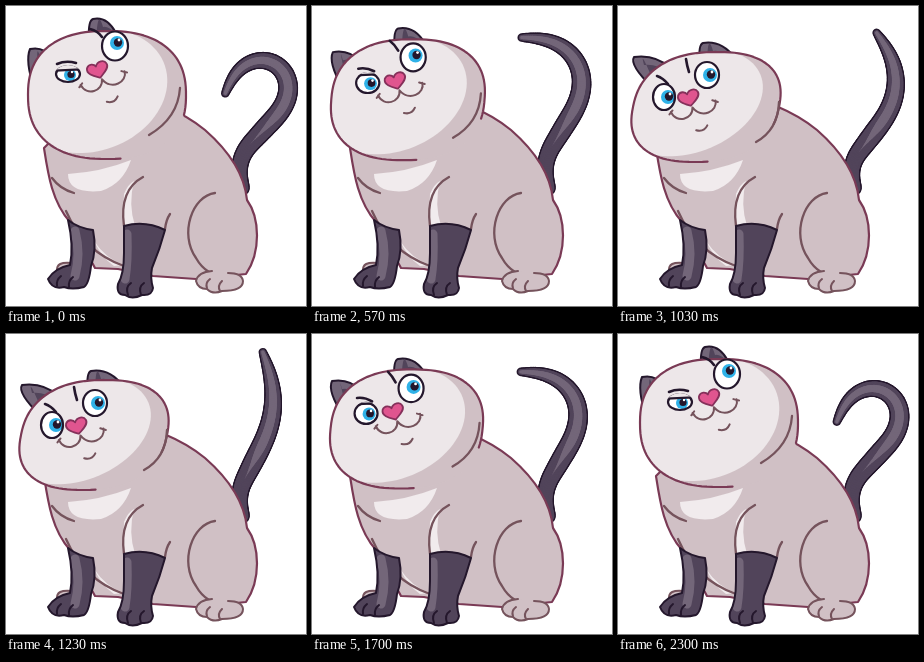
Recreate the animation shown at these times as an HTML page with a canvas. Size 300 by 300 pixels, loop 2.33 s.

```html
<!DOCTYPE html>
<html>
<head>
<meta charset="utf-8">
<style>
html, body { margin: 0; width: 100%; height: 100%; overflow: hidden; background: #fff; }
canvas { display: block; width: 100vw; height: 100vh; }
</style>
</head>
<body>
<canvas id="stage" width="300" height="300"></canvas>
<script>
const ctx = document.getElementById('stage').getContext('2d');
const LOOP = 2330, { PI, sin, cos, abs, sign } = Math;
const EDGE = '#7a3a55', LINE = '#75535c', INK = '#24172c';
const DARK = '#51445a', GLOW = '#736679', BODY = '#d0c0c5', FACE = '#ede7e9', SHINE = '#f1ebed';

const mix = (a, b, p) => a + (b - a) * p;
const smooth = (a, b, t) => {
  const u = Math.min(1, Math.max(0, (t - a) / (b - a)));
  return u * u * (3 - 2 * u);
};

// Head parts, looking up and looking ahead.
const up = {
  head: [101, 89, 79, 64, 0], fold: [174, 82, 172, 112, 143, 129],
  earL: [28, 82, 21, 28, 46, 52], earR: [83, 32, 84, -2, 110, 27],
  eyeL: [62, 68, 12, 8, 64, 69, 6], eyeR: [109, 40, 13, 14.5, 111, 37, 7],
  browL: [51, 58, 60, 54, 70, 57], browR: [84, 23, 92, 25, 96, 31],
  nose: [92, 64, -.3]
};
const ahead = {
  head: [88, 101, 73, 55, -.2], fold: [161, 96, 160, 124, 138, 136],
  earL: [35, 82, 13, 36, 53, 62], earR: [82, 56, 82, 22, 117, 52],
  eyeL: [46, 91, 11, 13, 50, 91, 7], eyeR: [89, 69, 12, 13, 92, 69, 7],
  browL: [39, 70, 45, 72, 50, 78], browR: [68, 53, 69, 60, 71, 66],
  nose: [71, 92, -.25]
};

const still = {
  body: 'M60 120L38 142C42 168 46 196 64 216L89 262L112 263L147 270L190 273L240 268C255 246 254 212 241 194C238 163 215 138 199 124Q182 110 158 100Z',
  chest: 'M62 168Q95 166 125 154Q117 178 95 185Q62 188 62 168Z',
  strips: 'M118 188Q122 178 128 175Q122 198 129 220L117 220ZM88 235Q100 253 118 259L108 260Q96 252 88 235Z',
  creases: 'M46 172Q54 183 68 187M60 205Q78 246 118 260M137 171Q113 184 118 220M159 223Q160 214 164 208M209 187C186 190 173 228 190 252Q195 261 203 266',
  backFoot: 'M66 257Q50 255 51 265L66 268Z',
  foot: 'M206 265Q192 266 190 275Q192 283 201 283Q207 289 216 285Q237 285 237 275Q236 267 222 267',
  toes: 'M201 282Q199 277 204 273M214 285Q211 280 216 275',
  legL: 'M62 214Q72 222 87 224Q91 244 85 260Q83 278 78 281Q66 284 58 281Q46 284 42 273Q49 262 64 259Q68 240 62 214Z',
  clawsL: 'M51 280Q50 274 55 270M63 281Q62 275 67 271',
  glowL: 'M69 225Q75 248 69 270',
  legR: 'M118 220Q139 214 159 224Q154 243 146 262Q144 272 147 282Q146 290 136 289Q126 294 119 289Q110 289 112 278Q118 268 118 247Z',
  clawsR: 'M122 289Q119 281 125 277M135 289Q132 281 138 277',
  glowR: 'M121 228Q122 255 119 273'
};
for (const k in still) still[k] = new Path2D(still[k]);

function paint(path, fill, stroke, width = 2) {
  if (fill) { ctx.fillStyle = fill; ctx.fill(path); }
  if (stroke) { ctx.strokeStyle = stroke; ctx.lineWidth = width; ctx.stroke(path); }
}
function clipped(path, draw) {
  ctx.save();
  ctx.clip(path);
  draw();
  ctx.restore();
}
function oval(x, y, rx, ry = rx) {
  const path = new Path2D();
  path.ellipse(x, y, rx, ry, 0, 0, 2 * PI);
  return path;
}
const bend = ([a, b, c, d, e, f]) => new Path2D(`M${a} ${b}Q${c} ${d} ${e} ${f}`);

// Sheared superellipse between two angles.
function blob([x, y, rx, ry, shear], power = 2.4, from = 0, to = 2 * PI) {
  const path = new Path2D(), round = v => sign(v) * abs(v) ** (2 / power);
  for (let i = 0; i <= 90; i++) {
    const a = mix(from, to, i / 90), dy = ry * round(sin(a));
    path.lineTo(x + rx * round(cos(a)) + shear * dy, y + dy);
  }
  return path;
}

// A chain of short steps whose heading first leans out, then curls back.
function drawTail(t, p) {
  const sway = sin(PI * (t - 700) / 780) ** 2, drift = sin(2 * PI * t / LOOP);
  const lean = mix(55 + 5 * drift, 8 + 44 * sway, p);
  const curl = mix(200, 108 * sway - 30, p);
  const steps = 90, step = mix(211 + 5 * drift, 172, p) / steps;
  const points = [[236, 182]];
  for (let i = 0; i < steps; i++) {
    const u = i / steps, [x, y] = points[i];
    const a = (lean * smooth(0, .25, u) - 12 - curl * smooth(.35, 1, u)) * PI / 180;
    points.push([x + step * sin(a), y - step * cos(a)]);
  }
  const band = (color, width, first = 0) => {
    ctx.strokeStyle = color;
    for (let i = first; i < steps; i++) {
      ctx.lineWidth = width(i / steps);
      ctx.beginPath();
      ctx.moveTo(...points[i]);
      ctx.lineTo(...points[i + 1]);
      ctx.stroke();
    }
  };
  const girth = u => 15 + 5 * smooth(0, .4, u) - 13 * u ** 4;
  band(INK, u => girth(u) + 1);
  band(DARK, u => girth(u) - 2);
  band(GLOW, u => girth(u) * .45 * smooth(.2, .45, u), 20);
}

function drawEar([ax, ay, tx, ty, bx, by]) {
  const ear = new Path2D(`M${ax} ${ay}Q${tx} ${ty - 8} ${tx + 6} ${ty + 14}Q${(tx + bx) / 2} ${ty + 12} ${bx} ${by}Z`);
  const tip = new Path2D(`M${ax} ${ay}Q${tx - 2} ${(ay + ty) / 2} ${tx + 3} ${ty + 15}Q${(tx + bx) / 2 + 4} ${ty + 12} ${bx} ${by}Z`);
  paint(tip, GLOW, INK);
  clipped(tip, () => {
    ctx.translate(7, 9);
    paint(ear, DARK);
  });
}

function drawEye([x, y, rx, ry, ix, iy, r]) {
  const ball = oval(x, y, rx, ry);
  paint(ball, '#fff');
  clipped(ball, () => {
    paint(oval(ix, iy, r), '#2fb2e8');
    paint(oval(ix + 1, iy - .5, r * .6), INK);
    paint(oval(ix + 2, iy - 3, r * .2), '#fff');
  });
  paint(ball, null, INK, 2.2);
}

function drawMuzzle([x, y, tilt]) {
  ctx.save();
  ctx.translate(x, y);
  ctx.rotate(tilt);
  paint(new Path2D('M0 8C-5 5-13 1-10-5C-7-9-2-7-1-4C2-9 9-8 10-4C12 1 4 5 0 8Z'), '#e0558f', '#85305a', 1.8);
  paint(new Path2D('M-21 9C-19 22-1 22 1 10C7 24 25 20 25 9M-23 11L-19 8M22 8L27 11M-1 33Q6 37 11 31'), null, LINE);
  ctx.restore();
}

function drawBody() {
  paint(still.backFoot, BODY, LINE);
  paint(still.body, BODY, EDGE, 2.2);
  paint(still.chest, SHINE);
  paint(still.strips, SHINE);
  paint(still.creases, null, LINE, 2.3);
  paint(still.foot, BODY, LINE);
  paint(still.toes, null, LINE);
  for (const side of 'LR') {
    const leg = still['leg' + side];
    paint(leg, DARK);
    clipped(leg, () => paint(still['glow' + side], null, GLOW, 9));
    paint(leg, null, INK);
    paint(still['claws' + side], null, INK);
  }
}

function drawHead(p) {
  const pose = {};
  for (const k in up) pose[k] = up[k].map((v, i) => mix(v, ahead[k][i], p));
  const [x, y, rx, ry, shear] = pose.head;
  const head = blob(pose.head);

  drawEar(pose.earL);
  drawEar(pose.earR);
  paint(head, BODY);
  clipped(head, () => paint(blob([x - 15, y - 4, rx * .94, ry * .97, shear - .2], 2), FACE));
  paint(blob(pose.head, 2.4, 1.45, 2 * PI + .25), null, EDGE, 2.2);
  paint(bend(pose.fold), null, LINE, 2.3);

  drawEye(pose.eyeL);
  drawEye(pose.eyeR);
  // The drooping lid opens as the head turns.
  const [ex, ey, ew, eh] = pose.eyeL;
  clipped(oval(ex, ey, ew + 1, eh + 1), () => {
    const lid = mix(ey - 3, ey - eh - 4, p);
    paint(new Path2D(`M${ex - 20} ${lid}L${ex + 20} ${lid - 2}V0H0Z`), FACE, INK, 2.2);
  });
  paint(bend(pose.browL), null, INK, 2.6);
  paint(bend(pose.browR), null, INK, 2.6);
  drawMuzzle(pose.nose);
}

function frame() {
  const t = performance.now() % LOOP;
  const ahead = smooth(400, 800, t) - smooth(1500, 1900, t);
  ctx.fillStyle = '#fff';
  ctx.fillRect(0, 0, 300, 300);
  ctx.lineCap = ctx.lineJoin = 'round';
  drawTail(t, ahead);
  drawBody();
  drawHead(ahead);
  requestAnimationFrame(frame);
}
frame();
</script>
</body>
</html>
```
